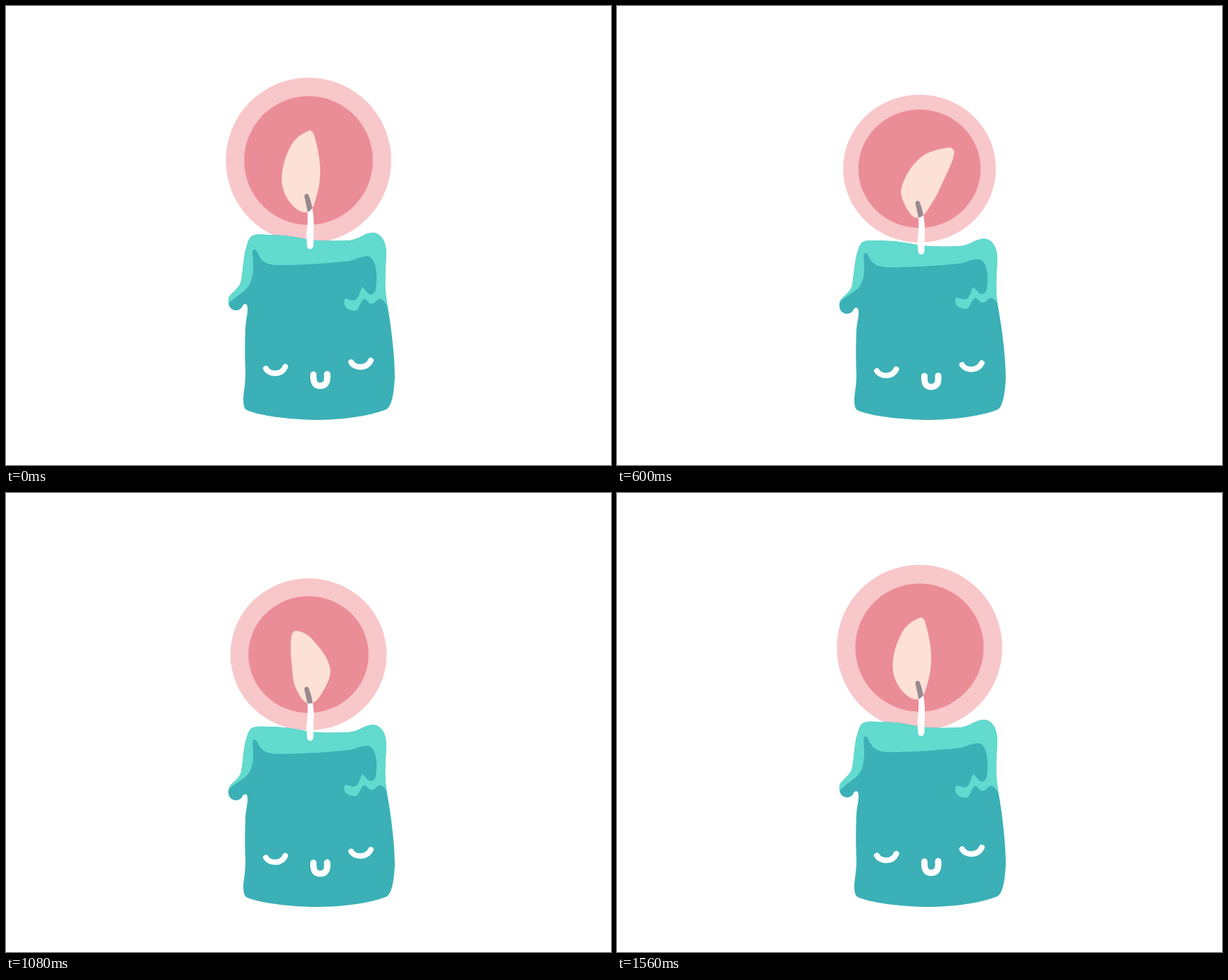
An HTML page with a canvas that plays this animation: 859 px wide and 652 px high, repeating every 1600 ms.

```html
<!DOCTYPE html>
<html lang="en">
<head>
<meta charset="utf-8">
<title>Sleeping candle</title>
<style>
  html, body { margin: 0; width: 100%; height: 100%; overflow: hidden; background: #fff; }
  canvas { display: block; }
</style>
</head>
<body>
<canvas id="stage" width="859" height="652"></canvas>
<script>
const ctx = document.getElementById('stage').getContext('2d');
const LOOP = 1600, STEP = 40, FLOOR = 588, SQUASH = 0.037;

const colors = {
  halo: '#f8c7c9', glow: '#eb8d97', flame: '#fde1d6', char: '#98898e',
  wax: '#3bb0b7', rim: '#62dace', white: '#fff'
};

const body = new Path2D(`M349 327 C354 324 362 324.5 370 325 C395 325 410 328 425 331
  C440 334 465 334 488 333 C502 331 508 323 520 322 C533 322 540 335 540 352
  C539 375 537 395 540 415 C542 430 546 448 548 470 C551 495 552 515 552 527
  C551 545 549 568 540 573 C515 583 475 588 438 588 C400 587 360 582 342 574
  C337 572 337 563 337 556 C338 545 340 535 340 522 C339 500 339 480 340 455
  C341 445 343 438 343 430 C343 422 338 422 336 426 C333 433 325 434 320 430
  C315 426 315 418 317 413 C320 407 332 401 334 390 C337 372 337 355 342 340
  C344 333 346 329 349 327 Z`);

const rim = new Path2D(`M310 424 H316 C320 416 335 409 343 400 C352 388 352 370 350 352
  C350 344 354 344 357 350 C362 361 366 367 385 368 C420 368 450 366 488 362
  C500 359 506 354 516 356 C526 361 528 385 525 402 C524 409 518 412 514 408 L506 399
  C503 402 502 416 495 418 C490 419 485 415 481 416 C479 422 481 429 487 431
  C492 433 497 434 499 431 C503 425 504 419 508 416 C512 416 515 424 520 423
  C525 422 527 416 531 416 C537 417 541 425 543 431 H560 V300 H310 Z`);

const wick = new Path2D(`M423.5 270 C424 266 429 265.5 430 269 C434 280 437 293 437 310
  L436.5 340 C436 347 428 347 427.5 341 L426.5 324 C428 312 429 302 428 291 Z`);

const eyes = new Path2D(`M369 515 C374 524 391 525 396.5 512.5
  M490 506 C495 515 512 516 518 503.5`);
const mouth = new Path2D('M436.5 523.5 C436 535 439 539.5 446 539.5 C454 539.5 457 534 456 523');

// Flame outlines, clockwise from the tip
const leanLeft = [398,186, 421,200, 450,240, 446,271, 428,293, 408,270, 395,234, 391,194];
const upright = [430,177, 437,182, 446,230, 441,270, 427,293, 401,276, 391.5,242, 406,196];
const flameKeys = [
  [0, upright],
  [150, leanLeft],
  [280, [421,187.5, 440,200, 463,242.5, 451,278, 431,294, 412,273, 409,239.5, 414,196]],
  [600, [471,188.5, 479,195.5, 464,236, 446,272, 427,291.5, 410,275, 404,247, 430,204]],
  [760, [437,176, 443,183, 440,226.5, 436,273.5, 424,291, 400,276.5, 389.5,240, 406,194.5]],
  [950, leanLeft],
  [1080, [412,185, 434,196.5, 460,238.5, 451,271.5, 431,291, 412,269.5, 406,237.5, 405,193.5]],
  [1360, [459,188, 467.5,195, 462,230, 447,269.5, 429,291, 408,277.5, 400.5,249.5, 425,208]],
  [1560, upright]
];

function keyAt(i) {
  const n = flameKeys.length, turn = Math.floor(i / n);
  const [time, points] = flameKeys[i - turn * n];
  return [time + turn * LOOP, points];
}

// Cubic Hermite blend through the unevenly spaced outlines
function flamePoints(t) {
  let i = flameKeys.length - 1;
  while (flameKeys[i][0] > t) i--;
  const [[ta, a], [tb, b], [tc, c], [td, d]] = [i - 1, i, i + 1, i + 2].map(keyAt);
  const span = tc - tb, u = (t - tb) / span;
  return b.map((p, j) => {
    const v0 = (c[j] - a[j]) / (tc - ta) * span;
    const v1 = (d[j] - p) / (td - tb) * span;
    const gap = c[j] - p;
    return p + u * (v0 + u * (3 * gap - 2 * v0 - v1 + u * (v0 + v1 - 2 * gap)));
  });
}

function smoothOutline(flat) {
  const n = flat.length / 2;
  const at = i => { const j = (i + n) % n * 2; return [flat[j], flat[j + 1]]; };
  const direction = i => {
    const [x0, y0] = at(i - 1), [x1, y1] = at(i + 1), len = Math.hypot(x1 - x0, y1 - y0);
    return [(x1 - x0) / len, (y1 - y0) / len];
  };
  const path = new Path2D();
  path.moveTo(...at(0));
  for (let i = 0; i < n; i++) {
    const [x0, y0] = at(i), [x1, y1] = at(i + 1);
    const [dx0, dy0] = direction(i), [dx1, dy1] = direction(i + 1);
    const h = Math.hypot(x1 - x0, y1 - y0) / 3;
    path.bezierCurveTo(x0 + dx0 * h, y0 + dy0 * h, x1 - dx1 * h, y1 - dy1 * h, x1, y1);
  }
  path.closePath();
  return path;
}

const wave = (t, peak) => Math.cos((t - peak) / LOOP * 2 * Math.PI);

function fill(path, color) {
  ctx.fillStyle = color;
  ctx.fill(path);
}

function disc(y, r, color) {
  const path = new Path2D();
  path.arc(429.5, y, r, 0, 2 * Math.PI);
  fill(path, color);
}

function clipped(path, draw) {
  ctx.save();
  ctx.clip(path);
  draw();
  ctx.restore();
}

function drawFace(k) {
  ctx.strokeStyle = colors.white;
  ctx.lineCap = 'round';
  ctx.lineWidth = 9;
  ctx.stroke(mouth);
  ctx.lineWidth = 8;
  ctx.translate(0, 1.2 * k);
  ctx.stroke(eyes);
}

function draw(t) {
  const k = (1 - wave(t, 0)) / 2;
  const scale = 1 - SQUASH * k;
  const flame = smoothOutline(flamePoints(t));

  ctx.setTransform(1, 0, 0, 1, 0, 0);
  ctx.fillStyle = colors.white;
  ctx.fillRect(0, 0, 859, 652);
  ctx.setTransform(1, 0, 0, scale, 0, FLOOR * (1 - scale));

  disc(219.3, 112.5 + 5 * wave(t, -40), colors.halo);
  disc(219.5, 88.1 + 3.6 * wave(t, 105), colors.glow);
  fill(flame, colors.flame);

  fill(body, colors.wax);
  clipped(body, () => {
    // The melted rim sags less than the body
    ctx.transform(1, 0, 0, 1 - 0.07 * k, 0, 21.15 * k);
    fill(rim, colors.rim);
  });

  fill(wick, colors.white);
  clipped(flame, () => fill(wick, colors.char));
  drawFace(k);
}

function tick() {
  const t = performance.now() % LOOP;
  draw(Math.floor(t / STEP) * STEP);
  requestAnimationFrame(tick);
}
tick();
</script>
</body>
</html>
```
